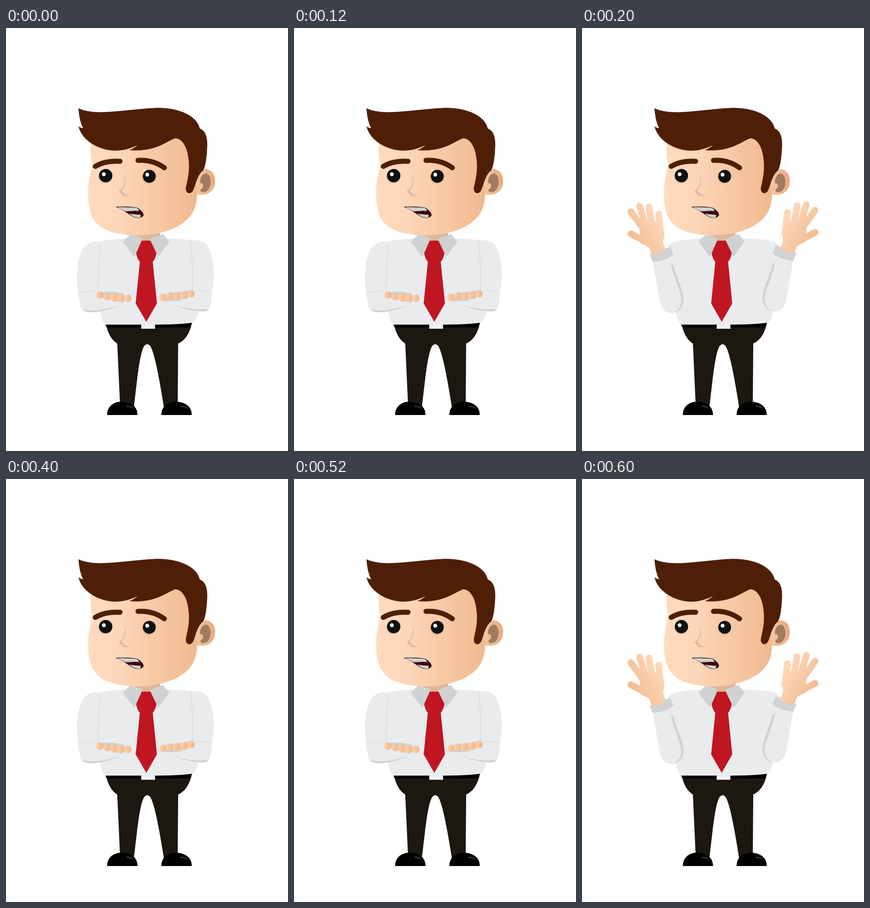
Recreate the animation shown at these times as an HTML page. Size 611 px wide and 917 px high, loop 800 ms.

```html
<!DOCTYPE html>
<html lang="en">
<head>
<meta charset="utf-8">
<title>Shrugging man</title>
<style>
html, body { margin: 0; width: 100%; height: 100%; overflow: hidden; background: #fff; }
svg { display: block; width: 100%; height: 100%; }
.shirt { fill: #e9ebed; }
.cuff { fill: #d1d2d3; }
.brown { fill: #4e1f06; }
.brow { fill: none; stroke: #4e1f06; stroke-width: 11; stroke-linecap: round; }
.fold { fill: none; stroke: #dddfe1; stroke-width: 2; stroke-linecap: round; }
.shade { fill: #d0d2d4; }
</style>
</head>
<body>
<svg viewBox="0 0 611 917">
  <defs>
    <linearGradient id="face" gradientUnits="userSpaceOnUse" x1="178" y1="0" x2="414" y2="0">
      <stop offset="0" stop-color="#ffdabe"/>
      <stop offset=".3" stop-color="#fdd6b8"/>
      <stop offset="1" stop-color="#efb98f"/>
    </linearGradient>
    <linearGradient id="ear" gradientUnits="userSpaceOnUse" x1="412" y1="0" x2="453" y2="0">
      <stop offset="0" stop-color="#f5c7a2"/>
      <stop offset="1" stop-color="#e8aa7e"/>
    </linearGradient>
    <linearGradient id="palm" gradientUnits="userSpaceOnUse" x1="112" y1="460" x2="172" y2="426">
      <stop offset="0" stop-color="#f1be96"/>
      <stop offset="1" stop-color="#fdd6b8"/>
    </linearGradient>
    <linearGradient id="tip">
      <stop offset="0" stop-color="#fdd3b2"/>
      <stop offset="1" stop-color="#eeb489"/>
    </linearGradient>
    <g id="shoe">
      <path d="M219 839C219 822 231 810 251 810C274 811 285 823 285 839Z"/>
      <path d="M261 819Q272 819 278 826Q271 821 261 821Z" fill="#555"/>
    </g>
    <g id="raisedArm">
      <path class="shirt" d="M153 505L168 590C171 610 182 618 194 618C212 617 221 604 219 586L230 500L197 488Z"/>
      <path class="shade" d="M193 513C194 511 197 512 198 515C204 540 220 568 220 590C219 606 209 615 199 617C209 611 217 601 215 587C213 568 199 543 193 513Z"/>
      <g fill="none" stroke="url(#palm)" stroke-width="14.5" stroke-linecap="round">
        <path d="M106 398L136 440M125 386L142 440M145 388L154 440M166 403L171 450M106 446L142 465"/>
      </g>
      <path fill="url(#palm)" d="M153 498L146 477C142 472 134 471 127 466L124 431L150 418L172 421L178.500 443C180 453 174 459 176 466L183 484Z"/>
      <path class="cuff" d="M146 490C160 494 179 488 181 478L191 474L198 491C189 501 170 506 153 507Z"/>
    </g>
  </defs>

  <g id="body">
    <path fill="#1d1712" d="M216 640C221 664 229 676 241 684L247 815L277 822C284 765 289 708 299 690Q306 681 313 690C323 708 333 765 342 822L372 815L373 684C389 677 399 660 403 638Z"/>
    <path d="M215 642L403 638L399 649H218Z"/>
    <use href="#shoe"/>
    <use href="#shoe" x="117.500"/>
    <path class="shirt" d="M187 473C193 462 214 459 264 456H345C388 458 418 457 430 471L416 612C414 627 412 635 403 639C375 643 340 643 300 643H216C209 640 206 630 204 612Z"/>
    <rect x="293" y="643" width="30" height="9" fill="#eff0f0"/>
    <path fill="#dfb599" d="M278 440H334V457L313 463H294L279 457Z"/>
    <path fill="#d0d1d2" d="M270 447L253 463L278 496L296 456ZM340 447L354 463L330 496L311 457Z"/>
    <path fill="#be1622" d="M294 461H313L326 488Q324 500 318 507L327 597L304 637L281 597L290 507Q284 500 282 488Z"/>

    <path fill="url(#ear)" d="M414 313C428 301 453 303 453 333C452 357 431 366 411 360Z"/>
    <path fill="#a17c62" d="M421 337C419 325 426 314 436 316C447 323 446 350 432 355C426 357 421 355 421 351C425 348 428 345 427 340C426 336 423 336 421 337Z"/>
    <path fill="url(#face)" d="M185 245C181 265 184 282 187 295C184 314 178 330 178 360C178 397 187 424 216 437C248 452 305 454 348 440C393 425 414 400 414 360L405 240L300 220Z"/>
    <path class="brown" d="M157 174C197 192 256 176 328 173C375 173 414 190 420 218C432 222 437 237 436 256C435 282 432 302 427 309C415 317 411 340 406 351C401 362 389 360 389.500 347C393 330 398 312 396 290C394 262 384 240 367 239C348 245 326 269 267 265Q277 261 285 254C268 262 254 266 235 266C195 264 163 240 157 213Q162 217 167 217C160 203 158 188 157 174Z"/>
    <path class="brow" d="M193.500 300Q215 287 247 289M286 287Q318 285 343 303"/>

    <g fill="#eabf9f">
      <circle cx="215" cy="322" r="15"/>
      <circle cx="309" cy="324" r="15"/>
    </g>
    <g fill="#101112">
      <circle cx="216" cy="320" r="14.500"/>
      <circle cx="310.500" cy="321.500" r="14"/>
    </g>
    <g fill="#fff">
      <circle cx="212" cy="317" r="4.200"/>
      <circle cx="306" cy="318" r="4.200"/>
    </g>

    <path fill="#e9b996" d="M253 315C263 329 260 344 250 352Q256 360 269 365L253 364L244 353C257 346 261 331 253 315Z"/>
    <path fill="#3a080a" stroke="#1c0b08" d="M239 388C257 387 276 388 284 390C293 395 298 401 297.500 406C295 412 284 412 278 410C265 404 258 395 239 388Z"/>
    <path fill="#cfd0d0" d="M241 388.500C257 388 276 389 283 390Q288 393 288 397C279 395 268 398 258 397ZM267 402C274 404 284 404 292 405L291 411C282 412 274 409 267 402Z"/>
  </g>

  <g id="folded">
    <path class="shirt" d="M206 464C184 460 171 466 162 489C153 508 152 542 156 570C158 590 160 606 166 611C180 615 198 616 208 614C228 610 244 605 258 600L265 570L215 470ZM400 461C420 459 434 462 441 482C452 508 453 545 446 571C446 594 443 607 437 611C413 612 386 607 358 600L348 570L395 470Z"/>
    <path class="fold" d="M204 465Q200 515 200 571M158 573Q176 569 193 572M401 463Q405 515 404 569M411 571Q429 568 446 572"/>
    <path class="shade" d="M165 610C196 617 222 606 250 602C225 608 202 620 172 615ZM358 600C386 607 413 613 440 609L434 614C405 616 382 607 358 600Z"/>
    <path class="cuff" d="M203 573C218 570 242 572 256 576L257 588L240 594L207 583ZM347 576C364 573 384 572 399 568L403 579L375 592L346 592Z"/>
    <g id="fingers" fill="url(#tip)"></g>
  </g>

  <g id="raised">
    <use href="#raisedArm"/>
    <use href="#raisedArm" transform="translate(611 -3) scale(-1 1)"/>
  </g>
</svg>
<script>
const HOLD = 200;
const el = id => document.getElementById(id);

const knuckles = [
  [203, 579, 8], [219, 582, 8.5], [234, 584, 9], [249, 586, 9], [264, 586, 8],
  [340, 584, 8], [355, 582, 9], [370, 581, 9], [386, 579, 9], [401, 576, 8]
];
el("fingers").innerHTML = knuckles
  .map(([x, y, r]) => `<circle cx="${x}" cy="${y}" r="${r}"/>`)
  .join("");

function draw(time) {
  const up = Math.floor(time / HOLD) % 2 === 1;
  // The body narrows slightly while the arms are raised.
  el("body").setAttribute("transform", up ? "matrix(.991 0 0 1 1.42 0)" : "");
  el("folded").style.display = up ? "none" : "";
  el("raised").style.display = up ? "" : "none";
}

const start = performance.now();
function tick() {
  draw(performance.now() - start);
  requestAnimationFrame(tick);
}
tick();
</script>
</body>
</html>
```
